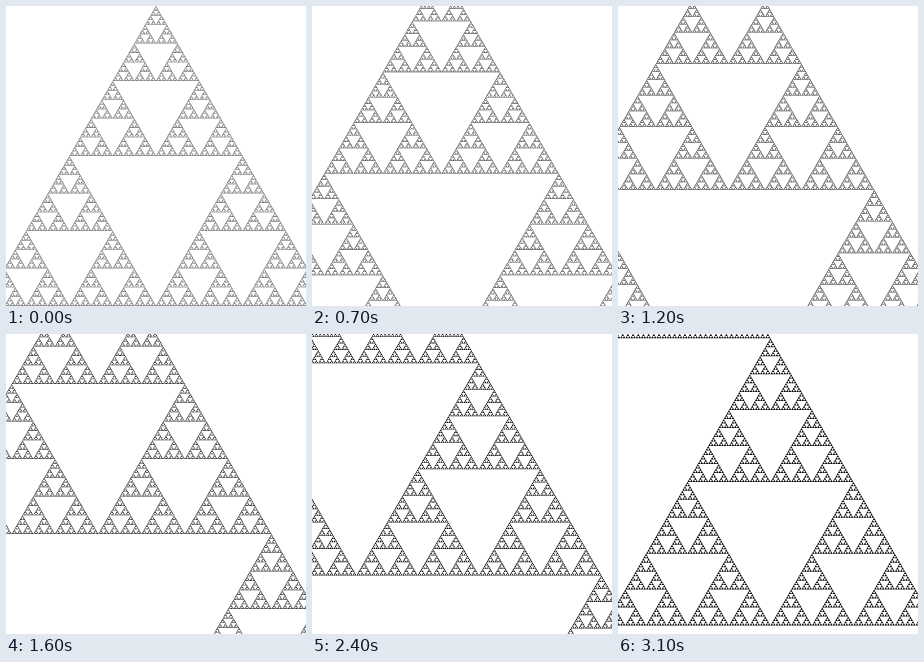
Animation, 300 px wide and 300 px high, one loop 3200 ms. Source, as an HTML page with a canvas:

```html
<!DOCTYPE html>
<html lang="en">
<head>
<meta charset="utf-8">
<title>Endless triangle zoom</title>
<style>
html, body { margin: 0; width: 100%; height: 100%; overflow: hidden; background: #fff; }
canvas { display: block; width: 300px; height: 300px; }
</style>
</head>
<body>
<canvas id="stage" width="300" height="300"></canvas>
<script>
const SIZE = 300, LOOP = 3200, STEPS = 32, DEPTH = 9;
const SLOPE = 1 / Math.sqrt(3); // half width per unit of height
// The zoom keeps this point still: the 4x smaller copy with its apex
// a quarter of the way down the right edge grows into the whole triangle.
const FIXED_X = SIZE / 2 + SIZE * SLOPE / 3, FIXED_Y = SIZE / 3;
const ctx = document.getElementById('stage').getContext('2d');

function addTriangle(x, y, height, depth) {
  const half = height * SLOPE;
  if (y > SIZE || y + height < 0 || x - half > SIZE || x + half < 0) return;
  if (depth === 0) {
    ctx.moveTo(x, y);
    ctx.lineTo(x + half, y + height);
    ctx.lineTo(x - half, y + height);
    ctx.closePath();
    return;
  }
  const h = height / 2;
  addTriangle(x, y, h, depth - 1);
  addTriangle(x - half / 2, y + h, h, depth - 1);
  addTriangle(x + half / 2, y + h, h, depth - 1);
}

function draw(step) {
  const scale = 4 ** (step / STEPS);
  ctx.fillStyle = '#fff';
  ctx.fillRect(0, 0, SIZE, SIZE);
  ctx.fillStyle = '#000';
  ctx.beginPath();
  addTriangle(FIXED_X + (SIZE / 2 - FIXED_X) * scale, FIXED_Y * (1 - scale), SIZE * scale, DEPTH);
  ctx.fill();
}

let shown = -1;
function tick() {
  const step = Math.floor(performance.now() % LOOP / LOOP * STEPS);
  if (step !== shown) draw(shown = step);
  requestAnimationFrame(tick);
}
tick();
</script>
</body>
</html>
```
